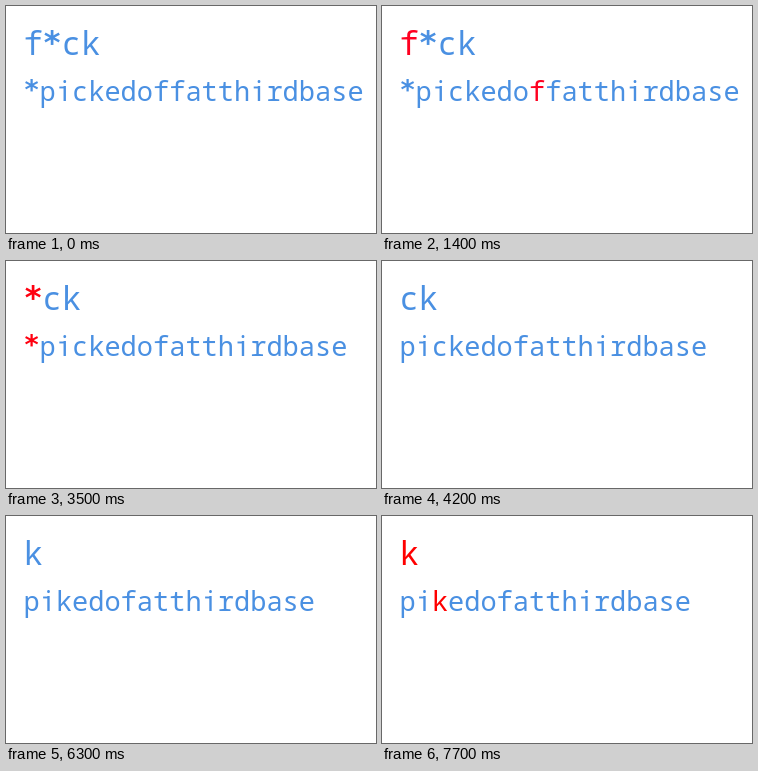
Recreate the animation shown at these times as an HTML page with a canvas. Size 370x227 px, loop 8 s.

```html
<!DOCTYPE html>
<html lang="en">
<head>
<meta charset="utf-8">
<style>
  html, body { margin: 0; width: 100%; height: 100%; overflow: hidden; background: #fff; }
  canvas { display: block; }
</style>
</head>
<body>
<canvas id="stage" width="370" height="227"></canvas>
<script>
const ctx = document.getElementById('stage').getContext('2d');
const BLUE = '#4a90e2', STEP = 700, LOOP = 8000, LEFT = 17.4, PITCH = 0.6;

// The first letter of the word is matched in the phrase, then both go.
const stages = [
  { word: 'f*ck', phrase: '*pickedoffatthirdbase', hit: 8, red: '#ff0020' },
  { word: '*ck', phrase: '*pickedofatthirdbase', hit: 0, red: '#ff0010' },
  { word: 'ck', phrase: 'pickedofatthirdbase', hit: 2, red: '#ff0000' },
  { word: 'k', phrase: 'pikedofatthirdbase', hit: 2, red: '#ff0000' }
];

// Asterisks are heavy and raised; "i" has a left serif but no foot.
function drawChar(ch, x, y, size) {
  if (ch === '*') {
    ctx.font = `bold ${size}px "DejaVu Sans Mono", monospace`;
    ctx.fillText(ch, x, y - size * 0.07);
  } else if (ch === 'i') {
    ctx.font = `${size}px "Noto Sans", sans-serif`;
    ctx.fillText(ch, x + size * 0.2, y);
    ctx.fillRect(x + size * 0.13, y - size * 0.536, size * 0.2, size * 0.07);
  } else {
    ctx.font = `${size}px "Noto Sans Mono", monospace`;
    ctx.fillText(ch, x, y);
  }
}

function drawLine(text, y, size, hit, red) {
  [...text].forEach((ch, i) => {
    ctx.fillStyle = i === hit ? red : BLUE;
    drawChar(ch, LEFT + i * size * PITCH, y, size);
  });
}

function draw(now) {
  const t = now % LOOP;
  const { word, phrase, hit, red } = stages[Math.floor(t / (3 * STEP))];
  const phase = Math.floor(t / STEP) % 3;
  ctx.fillStyle = '#fff';
  ctx.fillRect(0, 0, 370, 227);
  drawLine(word, 49, 32, phase > 0 ? 0 : -1, red);
  drawLine(phrase, 95, 27, phase > 1 ? hit : -1, red);
}

const start = performance.now();
function tick() {
  draw(performance.now() - start);
  requestAnimationFrame(tick);
}
tick();
</script>
</body>
</html>
```
